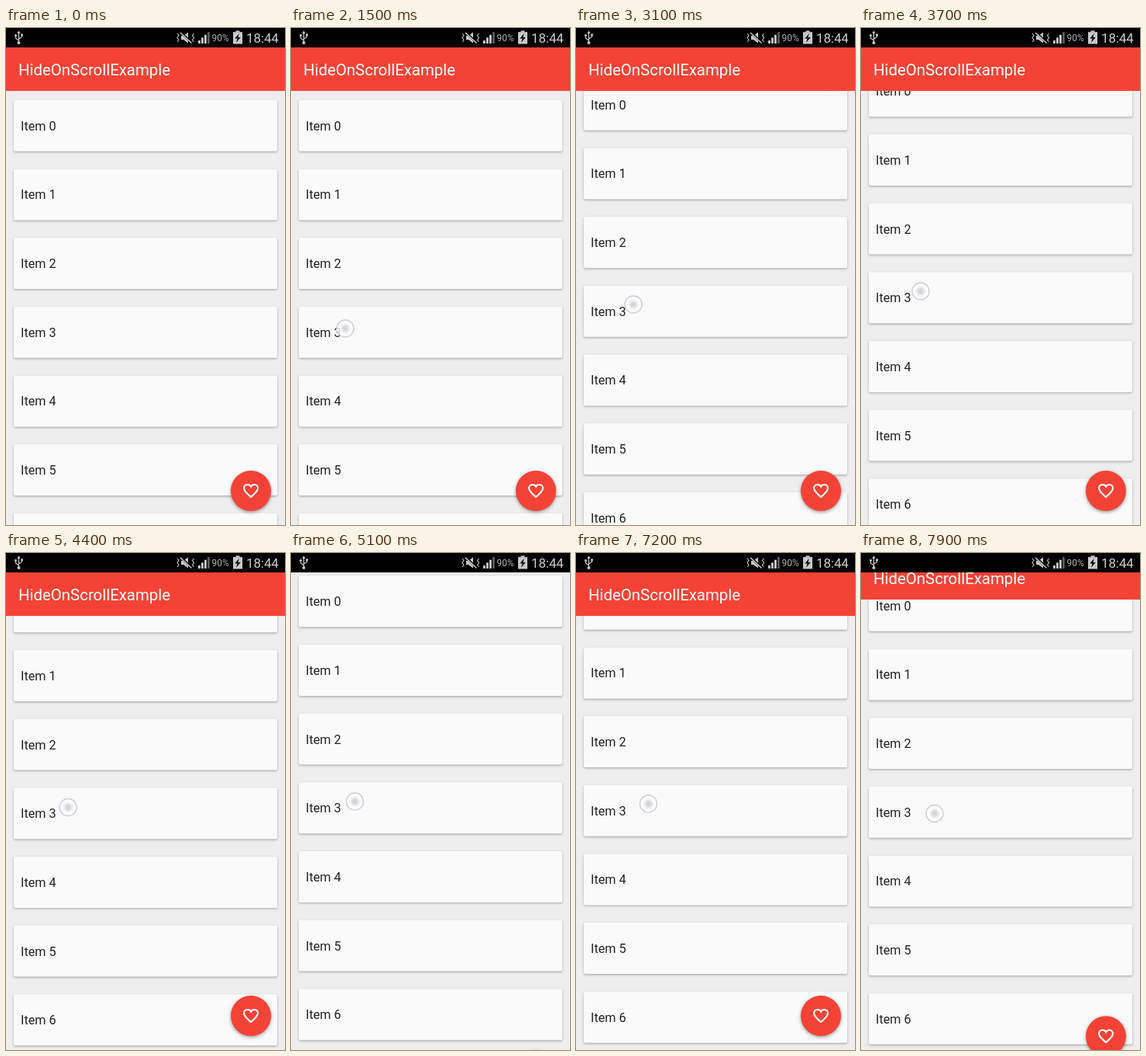
An HTML page with a canvas that plays this animation: 360 by 640 pixels, repeating every 8 s.

```html
<!DOCTYPE html>
<html lang="en">
<head>
<meta charset="utf-8">
<title>Hide on scroll</title>
<style>
html, body { margin: 0; width: 100%; height: 100%; overflow: hidden; background: #eee; }
canvas { display: block; width: 360px; height: 640px; }
</style>
</head>
<body>
<canvas id="stage" width="360" height="640"></canvas>
<script>
const ctx = document.getElementById('stage').getContext('2d');
const LOOP = 8000, STEP = 100;
const RED = '#f44336', ICON = '#c9c9c9';
const BAR_H = 25, TOOL_H = 56, FAB_TRAVEL = 70;
const CARD_TOP = 92.8, CARD_H = 66, PITCH = 88.65;
const ANIM = 300;

// time, list scroll, finger x, finger y
const DRAG = [
  [1300, 0, 70, 391],
  [1700, 0, 70, 383],
  [2500, 10.5, 71, 372],
  [3100, 27, 74, 356],
  [3700, 44.5, 77, 339],
  [4350, 56, 80, 328],
  [5100, 63.5, 82.5, 320],
  [5600, 80, 88, 303.5],
  [5900, 92, 92, 291.5],
  [6000, 90.5, 92.5, 294],
  [6300, 66, 92.5, 318],
  [6700, 58, 93, 325.5],
  [7200, 60, 93.5, 323],
  [7400, 64, 93.5, 319],
  [7700, 76, 94, 307],
  [7800, 72, 94.5, 313],
  [7900, 58, 95, 335.5]
];

// start time, true when the bars leave
const TOGGLES = [[4400, true], [6080, false], [7480, true], [7835, false]];

function dragAt(t) {
  if (t <= DRAG[0][0]) return DRAG[0].slice(1);
  for (let i = 1; i < DRAG.length; i++) {
    const a = DRAG[i - 1], b = DRAG[i];
    if (t <= b[0]) {
      const k = (t - a[0]) / (b[0] - a[0]);
      return [1, 2, 3].map(j => a[j] + (b[j] - a[j]) * k);
    }
  }
  return DRAG[DRAG.length - 1].slice(1);
}

// 0 = bars shown, 1 = bars gone
function hiddenAt(t) {
  let hidden = 0;
  for (const [start, leaving] of TOGGLES) {
    if (t < start) break;
    const p = Math.min(1, (t - start) / ANIM);
    hidden = leaving ? p ** 4 : (1 - p) ** 4;
  }
  return hidden;
}

function label(str, x, y, size, color) {
  ctx.font = size + 'px Roboto, sans-serif';
  ctx.fillStyle = color;
  ctx.fillText(str, x, y);
}

function box(x, y, w, h, color) {
  ctx.fillStyle = color;
  ctx.fillRect(x, y, w, h);
}

function disc(x, y, r, color) {
  ctx.fillStyle = color;
  ctx.beginPath();
  ctx.arc(x, y, r, 0, Math.PI * 2);
  ctx.fill();
}

function strokePath(d, width, color) {
  ctx.lineWidth = width;
  ctx.strokeStyle = color;
  ctx.stroke(new Path2D(d));
}

function fillPath(d, color) {
  ctx.fillStyle = color;
  ctx.fill(new Path2D(d));
}

function withShadow(blur, dy, alpha, draw) {
  ctx.save();
  ctx.shadowColor = `rgba(0,0,0,${alpha})`;
  ctx.shadowBlur = blur;
  ctx.shadowOffsetY = dy;
  draw();
  ctx.restore();
}

function drawCards(scroll) {
  for (let i = 0; i < 8; i++) {
    const y = CARD_TOP + i * PITCH - scroll;
    withShadow(3, 1.2, 0.3, () => {
      ctx.fillStyle = '#fafafa';
      ctx.beginPath();
      ctx.roundRect(10, y, 340, CARD_H, 2);
      ctx.fill();
    });
    label('Item ' + i, 19, y + 39, 16.2, '#222');
  }
}

function drawToolbar(hidden) {
  const y = BAR_H - TOOL_H * hidden;
  box(0, y, 360, TOOL_H, RED);
  label('HideOnScrollExample', 16, y + 36.2, 20.4, '#fff');
}

function drawFab(hidden) {
  const y = 596 + FAB_TRAVEL * hidden;
  withShadow(4, 1.5, 0.4, () => disc(316, y, 26, RED));
  ctx.save();
  ctx.translate(304, y - 12);
  strokePath('M12 20C6 14.7 3 12 3 8.5C3 6 5 4 7.5 4C9.5 4 11.3 5.2 12 6.7' +
    'C12.7 5.2 14.5 4 16.5 4C19 4 21 6 21 8.5C21 12 18 14.7 12 20Z', 2, '#fff');
  ctx.restore();
}

function drawTouch(x, y) {
  disc(x, y, 11, 'rgba(255,255,255,0.75)');
  const g = ctx.createRadialGradient(x, y, 0, x, y, 8);
  g.addColorStop(0, 'rgba(190,190,194,0.75)');
  g.addColorStop(0.5, 'rgba(205,205,208,0.6)');
  g.addColorStop(1, 'rgba(235,235,238,0)');
  disc(x, y, 8, g);
  ctx.lineWidth = 1.4;
  ctx.strokeStyle = '#cdcde2';
  ctx.beginPath();
  ctx.arc(x, y, 11, 0, Math.PI * 2);
  ctx.stroke();
}

function drawStatus() {
  box(0, 0, 360, BAR_H, '#000');
  // usb
  strokePath('M16.5 6V19M16.5 16L12.5 13V9.5M16.5 14L20.5 11.5V9', 1.2, ICON);
  fillPath('M16.5 3.5L18.6 7H14.4Z', ICON);
  disc(16.5, 19, 2, ICON);
  disc(12.5, 9.5, 1.5, ICON);
  box(19.2, 7.5, 2.7, 2.7, ICON);
  // muted speaker with vibration marks
  fillPath('M226 10H229L235 5.5V19.5L229 15H226Z', ICON);
  strokePath('M221 7L223 9.5L221 12.5L223 15.5L221 18M242.5 7L240.5 9.5L242.5 12.5L240.5 15.5L242.5 18', 1.1, ICON);
  strokePath('M225.5 5.5L240 19.5', 3, '#000');
  strokePath('M225 6L239.5 19.5', 1.5, ICON);
  // signal
  for (let i = 0; i < 4; i++) {
    const h = 4 + i * 3.6;
    box(248 + i * 4, 20 - h, 2.8, h, i < 3 ? ICON : '#5c5c5c');
  }
  label('90%', 265.6, 17.3, 12, '#b0b0b0');
  // charging battery
  box(296.5, 3.5, 5, 2, ICON);
  box(293, 5.2, 12, 15.3, ICON);
  fillPath('M300.8 7L295.3 13.5H298.6L297 18.8L302.7 12H299.4Z', '#000');
  label('18:44', 310, 18.8, 16.8, '#cfcfcf');
}

function render(t) {
  const [scroll, x, y] = dragAt(t);
  const hidden = hiddenAt(t);
  box(0, 0, 360, 640, '#eee');
  drawCards(scroll);
  drawToolbar(hidden);
  drawFab(hidden);
  if (t >= DRAG[0][0]) drawTouch(x, y);
  drawStatus();
}

const origin = performance.now();
function tick() {
  const t = (performance.now() - origin) % LOOP;
  render(Math.floor(t / STEP) * STEP);
  requestAnimationFrame(tick);
}
tick();
</script>
</body>
</html>
```
